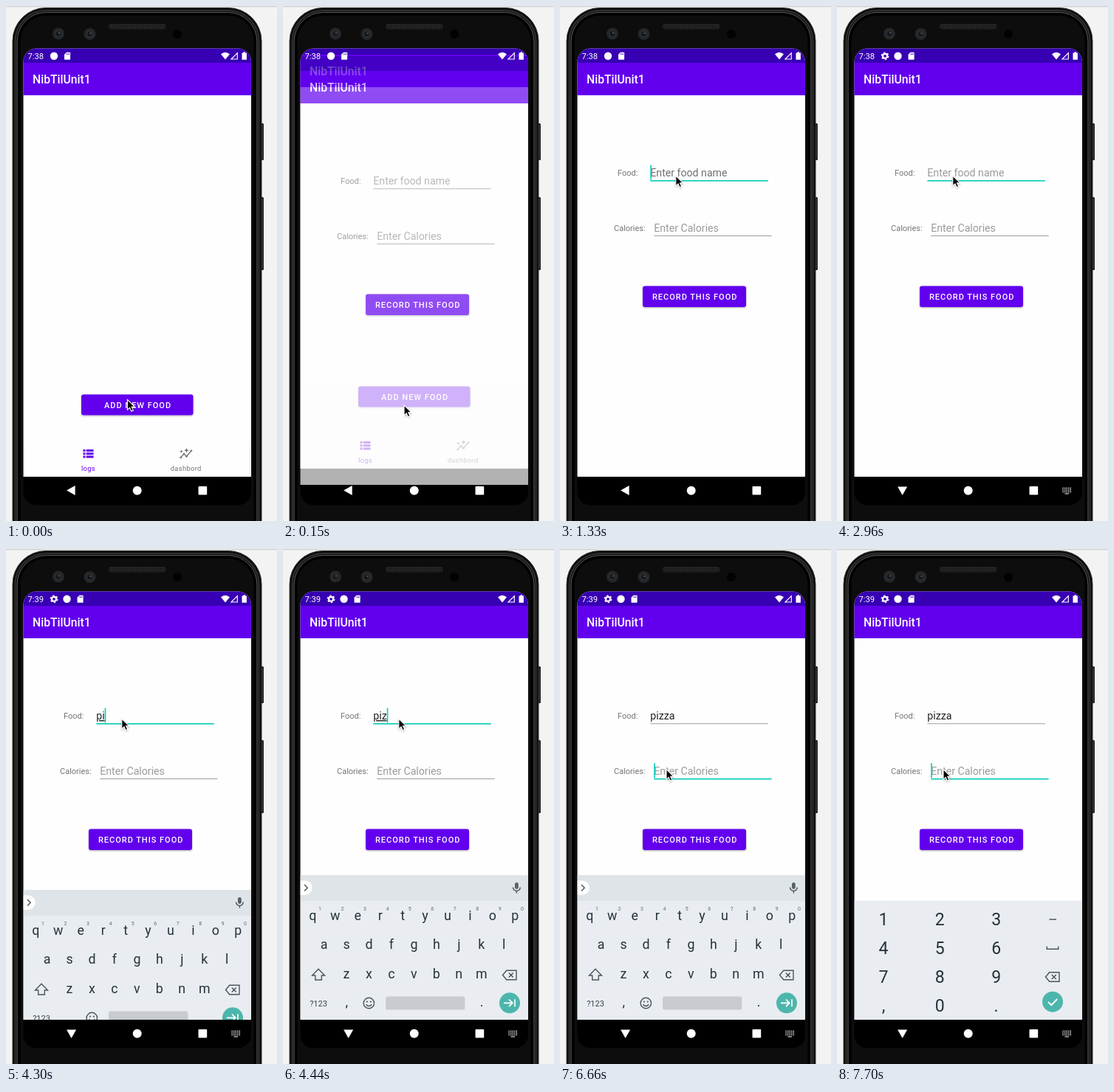
An HTML page for the animation above (8 s loop, 367 px wide and 698 px high).

```html
<!DOCTYPE html>
<html lang="en">
<head>
<meta charset="utf-8">
<title>Food log</title>
<style>
  html, body { margin: 0; width: 100%; height: 100%; overflow: hidden; background: #f3f3f3; }
  svg { display: block; width: 367px; height: 698px; font-family: Roboto, "Open Sans", sans-serif; }
  .label { font-size: 11px; fill: #757575; }
  .field { font-size: 14.15px; fill: #9b9b9b; }
  .button { font-size: 11px; font-weight: 500; letter-spacing: .98px; fill: #fff; }
  .tab { font-size: 9.43px; letter-spacing: .3px; text-anchor: middle; }
  .key { font-size: 17.8px; fill: #26323a; text-anchor: middle; }
  .small { font-size: 7px; fill: #5f6a72; text-anchor: middle; }
  .digit { font-size: 23px; fill: #26323a; text-anchor: middle; }
  .line { fill: none; stroke: #4a555c; stroke-width: 1.4; }
</style>
</head>
<body>
<svg viewBox="0 0 367 698">
  <defs>
    <clipPath id="screen"><rect x="23.5" y="57.5" width="308.5" height="619" rx="18"/></clipPath>
    <clipPath id="keyArea"><rect x="23.5" y="400" width="308.5" height="238"/></clipPath>
    <filter id="shadow" x="-10%" y="-20%" width="120%" height="160%">
      <feDropShadow dx="0" dy="1" stdDeviation=".8" flood-opacity=".35"/>
    </filter>
    <pattern id="mesh" width="3" height="3" patternUnits="userSpaceOnUse">
      <rect width="3" height="3" fill="#1b1b1b"/><circle cx="1.5" cy="1.5" r=".8" fill="#363636"/>
    </pattern>
    <g id="appBar">
      <rect x="23" y="57" width="310" height="20.3" fill="#3700b3"/>
      <rect x="23" y="77" width="310" height="44" fill="#6200ee"/>
      <text x="36" y="105" font-size="15.7" font-weight="500" fill="#fff">NibTilUnit1</text>
    </g>
    <g id="erase" class="line">
      <path d="M-9.5 0L-4.3-6.3H9V6.3H-4.3Z M-1.2-3L4.8 3M4.8-3L-1.2 3"/>
    </g>
  </defs>

  <rect width="367" height="698" fill="#f3f3f3"/>
  <rect width="367" height="1.4" fill="#d2d2d2"/>

  <g id="phone">
    <rect x="343" y="159" width="6" height="50" rx="1.5" fill="#1a1a1a"/>
    <rect x="343" y="259" width="6" height="99" rx="1.5" fill="#1a1a1a"/>
    <path d="M347.5 161V207M347.5 261V356" stroke="#444" stroke-width=".8"/>
    <rect x="9" y="2.5" width="337" height="760" rx="45" fill="#0b0b0b" stroke="#333"/>
    <rect x="12.5" y="6" width="330" height="753" rx="42" fill="none" stroke="#303030" stroke-width="2"/>
    <rect x="15" y="8.5" width="325" height="748" rx="39.5" fill="none" stroke="#636363" stroke-width=".9"/>
    <rect x="18" y="11.5" width="319" height="742" rx="36" fill="#0d0d0d" stroke="#000" stroke-width="3"/>
    <rect x="139" y="24" width="77.5" height="7.5" rx="3.7" fill="url(#mesh)"/>
    <g fill="#252628">
      <circle cx="71" cy="37.5" r="8"/><circle cx="113.5" cy="38" r="8"/>
    </g>
    <g fill="#11161b" stroke="#3a3f44" stroke-width=".8">
      <circle cx="71" cy="37.5" r="4"/><circle cx="113.5" cy="38" r="4"/>
    </g>
    <circle cx="72" cy="36.5" r="1.2" fill="#4c565f"/><circle cx="114.5" cy="37" r="1.2" fill="#4c565f"/>
    <circle cx="232" cy="38" r="6" fill="#020202"/>
  </g>

  <g clip-path="url(#screen)">
    <rect x="23" y="57" width="310" height="620"/>

    <g id="home">
      <rect x="23" y="57" width="310" height="581" fill="#fefefe"/>
      <use href="#appBar"/>
      <rect x="102" y="526.5" width="151.5" height="28" rx="3" fill="#6200ee" filter="url(#shadow)"/>
      <text class="button" x="133" y="545">ADD NEW FOOD</text>
      <path d="M25 597V638M330.5 597V638" stroke="#e6e6e6"/>
      <path d="M104.5 601h3v3h-3zm4.2 0h9.8v3h-9.8zM104.5 605.2h3v3h-3zm4.2 0h9.8v3h-9.8zM104.5 609.4h3v3h-3zm4.2 0h9.8v3h-9.8z" fill="#6200ee"/>
      <text class="tab" x="111.5" y="630" fill="#6200ee">logs</text>
      <g fill="#747474">
        <path d="M236.5 612L241 607L244.5 610.5L251 602.5" fill="none" stroke="#747474" stroke-width="1.4"/>
        <circle cx="236.7" cy="612" r="1.3"/><circle cx="241" cy="607" r="1.3"/>
        <circle cx="244.5" cy="610.5" r="1.3"/><circle cx="251" cy="602.7" r="1.3"/>
        <path d="M244.5 599l1 2.2 2.2 1-2.2 1-1 2.2-1-2.2-2.2-1 2.2-1zM237.5 601.5l.7 1.5 1.5.7-1.5.7-.7 1.5-.7-1.5-1.5-.7 1.5-.7z"/>
        <text class="tab" x="243.7" y="630">dashbord</text>
      </g>
    </g>

    <g id="form">
      <rect x="23" y="57" width="310" height="581" fill="#fefefe"/>
      <use href="#appBar"/>
      <text class="label" x="78" y="230">Food:</text>
      <text class="label" x="73" y="305">Calories:</text>
      <text class="field" id="foodText" x="122.3" y="231"></text>
      <text class="field" x="127.2" y="306">Enter Calories</text>
      <rect id="foodLine" x="122.3" width="159.5"/>
      <rect id="calLine" x="127.2" width="159.5"/>
      <rect id="caret" width="1.6" height="20" fill="#03cbb9"/>
      <rect x="112" y="379.5" width="140" height="28.5" rx="3" fill="#6200ee" filter="url(#shadow)"/>
      <text class="button" x="125" y="398.3">RECORD THIS FOOD</text>
    </g>

    <g fill="#fff">
      <text id="clock" x="29.5" y="72" font-size="11.2"></text>
      <g id="gear">
        <circle cx="65" cy="67.8" r="3" fill="none" stroke="#fff" stroke-width="2.2"/>
        <circle cx="65" cy="67.8" r="4.6" fill="none" stroke="#fff" stroke-width="1.6" stroke-dasharray="2.4 2.417"/>
      </g>
      <g id="notices">
        <circle cx="65" cy="67.8" r="5.2"/>
        <path d="M82 62.8h4.3q.8 0 .8.8v8.4q0 .8-.8.8h-6.5q-.8 0-.8-.8v-6.2z"/>
        <path d="M82.3 64.2v2M84 64.2v2M85.6 64.2v2" stroke="#3700b3" stroke-width=".8"/>
      </g>
      <path d="M291 65.3Q297 60.3 303 65.3L297 72.5Z"/>
      <path d="M305 72L313.3 63.6V72Z" fill="none" stroke="#fff" stroke-width="1.2"/>
      <path d="M321.5 62.2h2.4v1.2h2v9.3h-6.4v-9.3h2z"/>
      <path id="back" d="M-6.5 0L5-6.5V6.5Z"/>
      <circle cx="177.7" cy="656.7" r="6"/>
      <rect x="260.5" y="651" width="11.7" height="11.5" rx="1"/>
      <path id="imeIcon" d="M305.5 653.5H317M305.5 656H317M305.5 658.5H317" stroke="#fff" stroke-width="1.3" stroke-dasharray="1.3 1.25"/>
      <path id="imeBar" d="M308.5 661H314" stroke="#fff" stroke-width="1.2"/>
    </g>

    <g clip-path="url(#keyArea)">
      <g id="letters">
        <rect x="23" y="442" width="310" height="36" fill="#dfe4e8"/>
        <rect x="23" y="477" width="310" height="162" fill="#e9edf1"/>
        <path d="M23 449.5H30a9.7 9.7 0 0 1 0 19.4H23Z" fill="#fff"/>
        <path class="line" d="M29 455L33.2 459.3L29 463.6" stroke-width="1.6"/>
        <rect x="314" y="452" width="4.8" height="9" rx="2.4" fill="#566168"/>
        <path class="line" d="M311.5 458.5a4.9 4.9 0 0 0 9.8 0M316.4 463.4v3.2"/>
        <path class="line" d="M48 569.3L56.5 578H52.3V584H43.7V578H39.5Z"/>
        <use href="#erase" x="307" y="577.5"/>
        <text x="48" y="619.5" font-size="11" fill="#39454d" text-anchor="middle">?123</text>
        <circle class="line" cx="116.3" cy="615.5" r="7.2"/>
        <circle cx="113.8" cy="613.6" r="1.1" fill="#4a555c"/><circle cx="118.8" cy="613.6" r="1.1" fill="#4a555c"/>
        <path class="line" d="M112.6 617a4 4 0 0 0 7.4 0"/>
        <rect x="139" y="606.5" width="107.3" height="18" rx="2.5" fill="#c8ccd1"/>
        <circle cx="307" cy="615.3" r="14" fill="#4db6ac"/>
        <path d="M299 615.3H310.5M306 610.5L310.8 615.3L306 620.1M314 610.3V620.3" fill="none" stroke="#fff" stroke-width="1.7"/>
      </g>
      <g id="numbers">
        <rect x="23" y="476.5" width="310" height="162" fill="#e9edf1"/>
        <path class="line" d="M287.5 502H297" stroke-width="2"/>
        <path class="line" d="M284.3 538.5V542.3H299.7V538.5" stroke-width="1.7"/>
        <use href="#erase" x="292" y="580"/>
        <circle cx="292" cy="613.7" r="14" fill="#4db6ac"/>
        <path d="M286 614L290.3 618.2L298.3 610" fill="none" stroke="#fff" stroke-width="1.9"/>
      </g>
    </g>
  </g>

  <path id="cursor" d="M0 0V13.8L3.2 10.9L5.3 15.7L7.8 14.6L5.7 9.9H9.9Z" stroke="#fff" stroke-width="1.1" filter="url(#shadow)"/>
</svg>

<script>
const LOOP = 8000;
const $ = id => document.getElementById(id);
const set = (id, attrs) => {
  for (const name in attrs) $(id).setAttribute(name, attrs[name]);
};
const show = (id, on) => set(id, { visibility: on ? "visible" : "hidden" });
const within = (t, from, to) => t >= from && t < to;

// Value of the last [time, value] pair that has begun.
const at = (steps, t) => steps.reduce((value, step) => t >= step[0] ? step[1] : value, steps[0][1]);

function addText(parent, className, x, y, content) {
  const text = document.createElementNS("http://www.w3.org/2000/svg", "text");
  text.setAttribute("class", className);
  text.setAttribute("x", x);
  text.setAttribute("y", y);
  text.textContent = content;
  $(parent).append(text);
}

function buildKeys() {
  const rows = [["qwertyuiop", 40.3, 503], ["asdfghjkl", 55.6, 542.3], ["zxcvbnm", 86, 582.3]];
  for (const [keys, x, y] of rows)
    [...keys].forEach((key, i) => addText("letters", "key", x + i * 30.45, y, key));
  [..."1234567890"].forEach((key, i) => addText("letters", "small", 50 + i * 30.45, 490, key));
  addText("letters", "key", 86.3, 620, ",");
  addText("letters", "key", 269, 620, ".");
  ["123", "456", "789", ",0."].forEach((row, r) =>
    [...row].forEach((key, c) => addText("numbers", "digit", 63 + c * 76.3, 510 + r * 39, key)));
}

const typed = [[0, ""], [3260, "p"], [4300, "pi"], [4440, "piz"], [4590, "pizz"], [5330, "pizza"]];
const caretShown = [
  [0, false], [1330, true], [1920, false], [2360, true], [2960, false], [3260, true],
  [3700, false], [4300, true], [5180, false], [5330, true], [5780, false],
  [6660, true], [7110, false], [7700, true]
];
const tick = 147;

// The pointer advances in visible ticks along an eased path.
function glide(t, start, count, from, to) {
  const step = Math.min(count, Math.max(0, Math.floor((t - start) / tick) + 1));
  const p = step / count, eased = p * p * (3 - 2 * p);
  return from.map((v, i) => v + (to[i] - v) * eased);
}

function cursorAt(t) {
  if (t < 150) return [164.5, 533.5];
  if (t < 5930) return glide(t, 440, 5, [164, 541], [156.8, 230]);
  return glide(t, 5930, 5, [156.8, 230], [144, 298.5]);
}

function underline(id, y, focused) {
  set(id, {
    y: focused ? y - .3 : y,
    height: focused ? 1.6 : .8,
    fill: focused ? "#03cbb9" : "#868686"
  });
}

function update(t) {
  const opening = within(t, 150, 300);
  show("home", t < 300);
  show("form", t >= 150);
  set("home", { transform: `translate(0 ${opening ? -11 : 0})` });
  set("form", { transform: `translate(0 ${opening ? 11 : 0})`, opacity: opening ? .7 : 1 });

  const text = at(typed, t);
  const onFood = within(t, 1330, 6660), onCalories = t >= 6660;
  const food = $("foodText");
  food.textContent = text || "Enter food name";
  food.style.fill = text ? "#202020" : within(t, 1330, 1620) ? "#707070" : "#9b9b9b";
  food.style.textDecoration = text && onFood ? "underline" : "none";
  underline("foodLine", 236.4, onFood);
  underline("calLine", 311.2, onCalories);

  const caretOn = at(caretShown, t);
  const textWidth = text ? food.getComputedTextLength() : 0;
  show("caret", caretOn);
  set("caret", onCalories ? { x: 127.2, y: 290.3 } : { x: 122.3 + textWidth, y: 215.5 });

  const imeOpen = t >= 2210;
  $("clock").textContent = t < 3410 ? "7:38" : "7:39";
  show("gear", imeOpen);
  set("notices", { transform: `translate(${imeOpen ? 17.5 : 0} 0)` });
  show("imeIcon", imeOpen);
  show("imeBar", imeOpen);
  const turn = at([[0, 0], [2210, -45], [2360, -90]], t);
  set("back", { transform: `translate(88.6 656.5) rotate(${turn})` });

  show("letters", within(t, 4300, 6810));
  set("letters", { transform: `translate(0 ${t < 4440 ? 20 : 0})` });
  show("numbers", t >= 6810);

  set("cursor", { transform: `translate(${cursorAt(t).join(" ")})` });
}

buildKeys();
const startTime = performance.now();
function frame() {
  update((performance.now() - startTime) % LOOP);
  requestAnimationFrame(frame);
}
frame();
</script>
</body>
</html>
```
